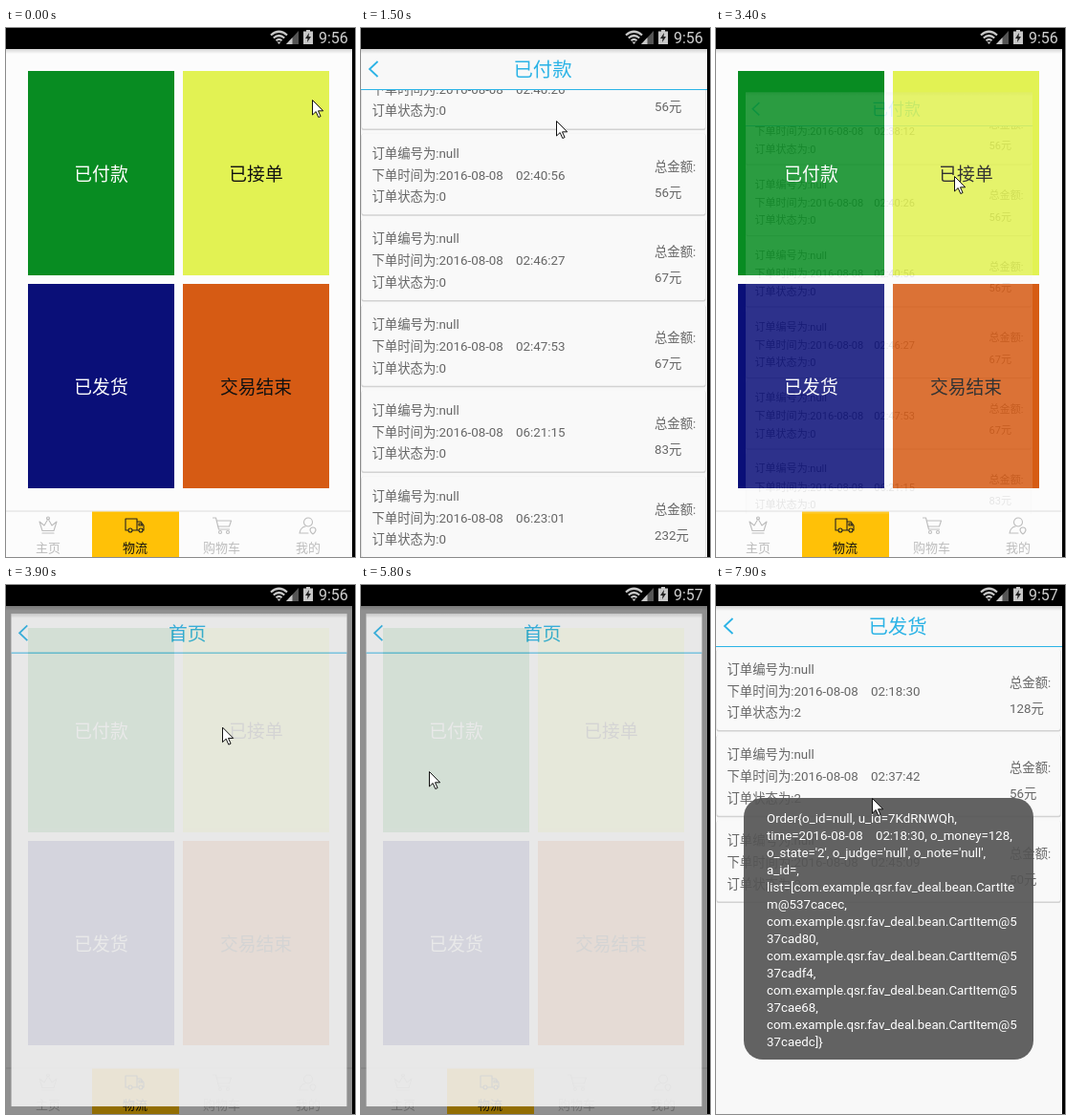
An HTML page that plays this animation: 365 by 554 pixels, repeating every 8000 ms.

```html
<!DOCTYPE html>
<html lang="zh">
<head>
<meta charset="utf-8">
<style>
html, body { margin: 0; width: 100%; height: 100%; overflow: hidden; background: #000; }
svg { display: block; width: 365px; height: 554px; font-family: Roboto, 'Noto Sans CJK SC', 'Noto Sans CJK', sans-serif; }
text { white-space: pre; }
.mid { text-anchor: middle; }
.tile { font-size: 18.8px; font-weight: 500; }
.tab { font-size: 13px; fill: #bdbdbd; }
.row { font-size: 13.35px; fill: #666; }
.title { font-size: 20.4px; fill: #2bb3e6; }
.icon { fill: none; stroke: #bdbdbd; stroke-width: 1.1; stroke-linejoin: round; stroke-linecap: round; }
.active { fill: #111; font-weight: 500; }
.icon.active { fill: none; stroke: #222; }
.toast { font-size: 13.3px; font-stretch: 75%; fill: #fff; }
</style>
</head>
<body>
<svg id="stage" viewBox="0 0 365 554"></svg>
<script>
const stage = document.getElementById('stage');
const $ = id => document.getElementById(id);
const text = (x, y, s, cls, more = '') => `<text x="${x}" y="${y}" class="${cls}" ${more}>${s}</text>`;
const rect = (x, y, w, h, fill, more = '') => `<rect x="${x}" y="${y}" width="${w}" height="${h}" fill="${fill}" ${more}/>`;

const PITCH = 89.75;
const FADE = 325;
const sections = [
  { name: '已付款', open: 400, load: 900, close: 3200, rows: [
    ['02:38:12', 56], ['02:40:26', 56], ['02:40:56', 56], ['02:46:27', 67],
    ['02:47:53', 67], ['06:21:15', 83], ['06:23:01', 232]] },
  { name: '已接单', open: 3700, load: 4200, close: 5000, rows: [
    ['02:03:29', 128], ['02:22:51', 128], ['02:52:28', 85]] },
  { name: '已发货', open: 5600, load: 6100, close: 9000, rows: [
    ['02:18:30', 128], ['02:37:42', 56], ['02:45:09', 50]] }
];

// [time, x, y]
const cursorPath = [
  [0, 320, 75], [300, 94, 164], [500, 94, 164], [900, 150, 215], [1300, 205, 235],
  [1400, 205, 190], [1500, 204, 97], [1800, 204, 97], [2600, 206, 194], [3000, 10, 41],
  [3200, 10, 41], [3400, 249, 155], [3600, 255, 160], [3800, 255, 160], [4600, 23, 69],
  [4800, 9, 42], [4900, 9, 42], [5000, 10, 46], [5100, 10, 46], [5500, 90, 320],
  [5700, 85, 300], [5800, 71, 195], [6400, 9, 28], [6600, 9, 28], [7000, 116, 96],
  [7200, 116, 96], [7900, 163, 223]
];
// [time, offset]
const scrollPath = [[1300, 0], [1400, 45], [1500, 136.3], [1800, 136.3], [2600, 39.3]];

function along(path, t) {
  if (t <= path[0][0]) return path[0].slice(1);
  const i = path.findIndex(k => k[0] > t);
  if (i < 0) return path[path.length - 1].slice(1);
  const a = path[i - 1], b = path[i], f = (t - a[0]) / (b[0] - a[0]);
  return a.slice(1).map((v, j) => v + (b[j + 1] - v) * f);
}
const ease = v => 1 - (1 - Math.min(1, Math.max(0, v))) ** 2;

const tile = (x, y, fill, color, s) =>
  rect(x, y, 153, 214, fill) + text(x + 76.5, y + 115, s, 'tile mid', `fill="${color}"`);

const tab = (x, s, icon, cls = '') =>
  text(x, 549, s, `tab mid ${cls}`) + `<path class="icon ${cls}" transform="translate(${x} 521)" d="${icon}"/>`;

const crown = 'M-6 8H6M-6 5.5-9-4-4 0 0-7 4 0 9-4 6 5.5ZM-1.5-7.5a1.5 1.5 0 1 0 3 0a1.5 1.5 0 1 0-3 0';
const truck = 'M-7 5H-10V-7H2V5H-3M2-4H6L9 0V5H8M4 5H2M-7 5a2 2 0 1 0 4 0a2 2 0 1 0-4 0M4 5a2 2 0 1 0 4 0a2 2 0 1 0-4 0M4-2H6L7.5 0H4Z';
const cart = 'M-9-8H-6L-3 4H8M-5-5H10L8 1H-4M-3 7a1.5 1.5 0 1 0 3 0a1.5 1.5 0 1 0-3 0M5 7a1.5 1.5 0 1 0 3 0a1.5 1.5 0 1 0-3 0';
const person = 'M-4.5-3.5a4.5 4.5 0 1 0 9 0a4.5 4.5 0 1 0-9 0M-9 8Q-8 2-3 1M-9 8H0M2 5a3 3 0 0 1 6 0q-1 3-3 4q-2-1-3-4';

const home = `<g id="home">${rect(0, 22, 362, 532, '#fcfcfc')}${rect(0, 22, 362, 5, 'url(#shade)')}
  ${tile(23, 45, '#088c22', '#fff', '已付款')}${tile(185, 45, '#e2f253', '#111', '已接单')}
  ${tile(23, 268, '#0a0f78', '#fff', '已发货')}${tile(185, 268, '#d65b14', '#111', '交易结束')}
  ${rect(0, 505.5, 362, 1, '#ddd')}${rect(90, 506.5, 91, 47.5, '#ffc107')}
  ${tab(44, '主页', crown)}${tab(135, '物流', truck, 'active')}${tab(225.5, '购物车', cart)}${tab(316, '我的', person)}</g>`;

const order = (state, [time, money], i) => `<g transform="translate(0 ${i * PITCH})">
  ${rect(.5, 67.5, 360, 86, '#d2d2d2', 'rx="2"')}${rect(1, 67, 359, 85, '#f9f9f9', 'rx="2"')}
  ${text(11.5, 92.5, '订单编号为:null', 'row')}${text(11.5, 115.5, '下单时间为:2016-08-08', 'row')}${text(162, 115.5, time, 'row')}
  ${text(11.5, 138, '订单状态为:' + state, 'row')}${text(307, 106.5, '总金额:', 'row')}${text(307, 133.5, money + '元', 'row')}</g>`;

const detail = (s, i) => `<g id="page${i}" clip-path="url(#window)">${rect(0, 22, 362, 532, '#f8f8f8')}
  <g id="rows${i}">${s.rows.map((r, n) => order(i, r, n)).join('')}</g>
  ${rect(0, 22, 362, 43, '#f8f8f8')}${rect(0, 22, 362, 5, 'url(#shade)')}${rect(0, 64, 362, 1, '#2bb3e6')}
  <path d="M17.5 35 9 43l8.5 8" fill="none" stroke="#2bb3e6" stroke-width="1.8"/>
  ${text(190, 51, '首页', 'title mid', `id="title${i}"`)}</g>`;

const item = 'com.example.qsr.fav_deal.bean.CartItem@5';
const message = ['Order{o_id=null, u_id=7KdRNWQh,', 'time=2016-08-08    02:18:30, o_money=128,',
  "o_state='2', o_judge='null', o_note='null',", 'a_id=,', 'list=[com.example.qsr.fav_deal.bean.CartIte', 'm@537cacec,',
  ...['37cad80,', '37cadf4,', '37cae68,', '37caedc]}'].flatMap(end => [item, end])];

const statusBar = `${rect(0, 0, 365, 22, '#000')}${rect(362, 0, 3, 554, '#000')}
  <g fill="none" stroke="#c8c8c8" stroke-width="2.2"><path d="M277 7.5Q285.5 0 294 7.5M279.8 10.5Q285.5 5.5 291.2 10.5M282.5 13.2Q285.5 10.5 288.5 13.2"/></g>
  <path d="M283.5 14.5h4l-2 2.5z" fill="#c8c8c8"/>
  <path d="M306 3v14h-13z" fill="#555"/><path d="M299.5 10v7H293z" fill="#c8c8c8"/>
  <path d="M314 2h4v1.5h3V17h-10V3.5h3z" fill="#c8c8c8"/><path d="M317 5l-4 6h2.5l-.5 4 4-6h-2.5z" fill="#222"/>
  ${text(327, 16, '9:56', '', 'id="clock" fill="#d0d0d0" font-size="16"')}`;

stage.innerHTML = `<defs>
  <linearGradient id="shade" x2="0" y2="1"><stop stop-color="#000" stop-opacity=".16"/><stop offset="1" stop-color="#000" stop-opacity="0"/></linearGradient>
  <clipPath id="window">${rect(0, 22, 362, 532, '#000')}</clipPath></defs>
  ${home}${sections.map(detail).join('')}${statusBar}
  <g id="toast">${rect(29, 223, 303, 274, '#545454', 'rx="20" fill-opacity=".91"')}
  ${message.map((s, i) => text(53, 249 + 18 * i, s, 'toast')).join('')}</g>
  <path id="cursor" d="M.5 .5V16l3.7-3.5 2.6 6 2.3-1-2.6-5.7h5.2z" fill="#fff" stroke="#111"/>`;

function draw(t) {
  let homeAlpha = 1;
  sections.forEach((s, i) => {
    const enter = ease((t - s.open) / FADE), leave = ease((t - s.close) / FADE);
    const alpha = enter * (1 - leave), scale = .8 + .2 * enter - .2 * leave;
    const page = $('page' + i);
    page.setAttribute('opacity', alpha);
    page.setAttribute('transform', `translate(181 288) scale(${scale}) translate(-181 -288)`);
    $('rows' + i).setAttribute('visibility', t >= s.load ? 'visible' : 'hidden');
    $('title' + i).textContent = t >= s.load ? s.name : '首页';
    if (alpha > 0 && leave === 0) homeAlpha = 1 - .5 * enter;
  });
  $('home').setAttribute('opacity', homeAlpha);
  $('rows0').setAttribute('transform', `translate(0 ${-along(scrollPath, t)[0]})`);
  $('clock').textContent = t >= 5400 ? '9:57' : '9:56';
  $('toast').setAttribute('opacity', ease((t - 7400) / 400));
  $('cursor').setAttribute('transform', `translate(${along(cursorPath, t)})`);
}

function tick() {
  draw(Math.floor(performance.now() % 8000 / 100) * 100);
  requestAnimationFrame(tick);
}
tick();
</script>
</body>
</html>
```
